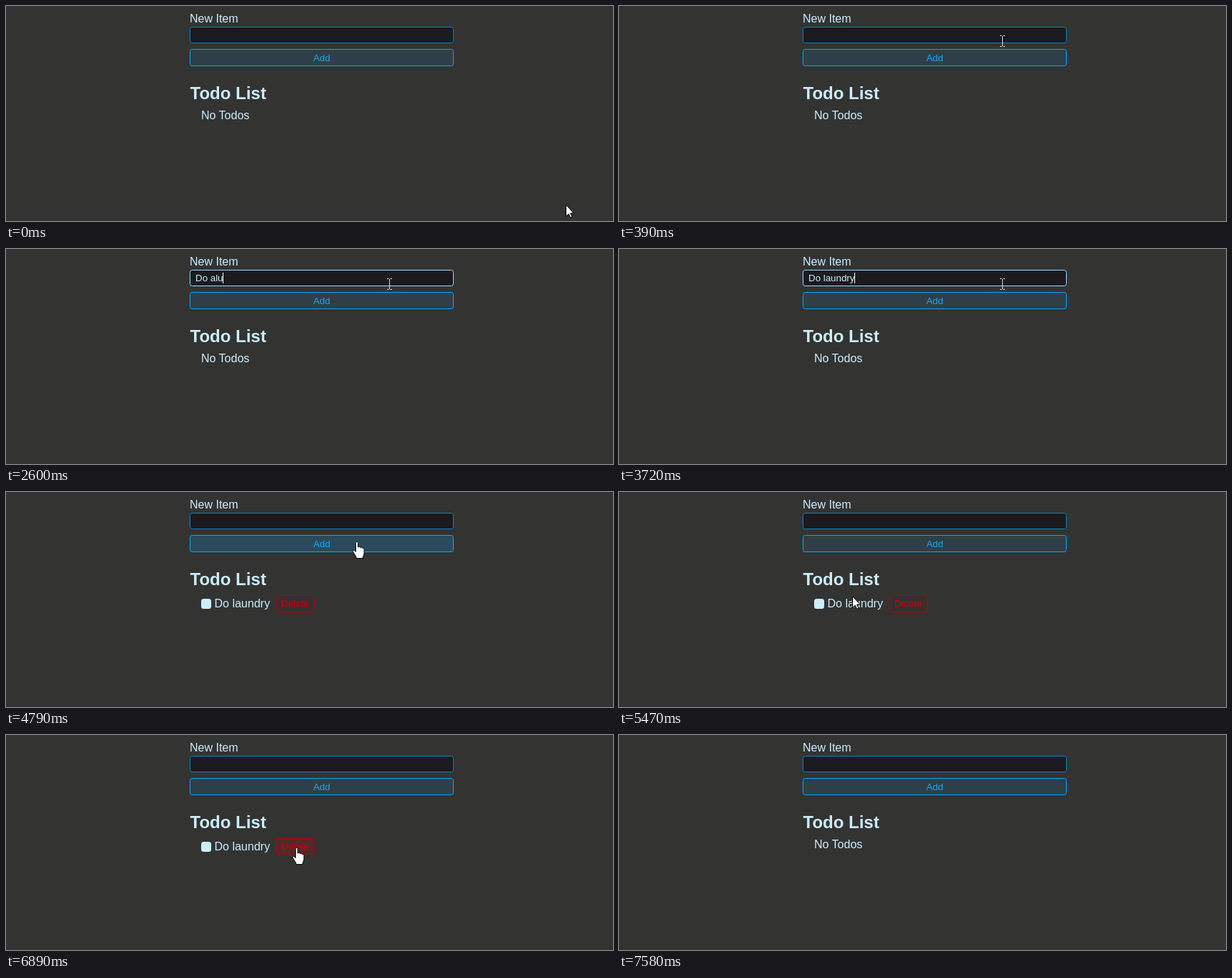
Write an HTML page that moves like this. It is 846 by 300 pixels and loops after 7.91 s.

```html
<!DOCTYPE html>
<html lang="en">
<head>
<meta charset="utf-8">
<title>Todo List</title>
<style>
  html, body { margin: 0; width: 100%; height: 100%; overflow: hidden; background: #333332; }
  svg { display: block; width: 846px; height: 300px; }
  text { font: 16px "Liberation Sans", Arial, sans-serif; fill: #cceeff; white-space: pre; }
  .small { font-size: 13.333px; }
  .head { font-size: 24px; font-weight: bold; }
  .hint { font: 12px "Open Sans", "Noto Sans", sans-serif; fill: #a0a0a0; }
  .pointer { fill: #fff; stroke: #000; stroke-width: 1; stroke-linejoin: round; }
</style>
</head>
<body>
<svg viewBox="0 0 846 300" xmlns="http://www.w3.org/2000/svg">
  <rect width="846" height="300" fill="#333332"/>
  <text x="256" y="23">New Item</text>
  <rect id="field" x="256.5" y="29.5" width="367" height="22" rx="3" fill="#1b1a1e"/>
  <text id="typed" class="small" x="264" y="45"></text>
  <rect id="caret" y="33" width="1" height="15" fill="#fff"/>

  <rect id="add" x="256.5" y="60.5" width="367" height="23" rx="3" stroke="#00aaff"/>
  <text class="small" x="440" y="77" text-anchor="middle" style="fill:#1aa5f5">Add</text>

  <text class="head" x="256.5" y="130">Todo List</text>
  <text id="empty" x="272" y="158">No Todos</text>

  <g id="item">
    <rect id="box" x="272" y="149" width="14" height="14" rx="3.5"/>
    <path id="tick" d="M275 156.5l3 3 5.5-6.5" fill="none" stroke="#fff" stroke-width="2"/>
    <text id="label" x="290.5" y="161">Do laundry</text>
    <rect id="del" x="376.5" y="144.5" width="53" height="23" rx="3" stroke="#b80006"/>
    <text class="small" x="403" y="160" text-anchor="middle" style="fill:#cc0006">Delete</text>
  </g>

  <g id="popup">
    <rect x="357" y="68" width="151" height="74" rx="3" fill="#2b2b2d"/>
    <text class="hint" x="370" y="90">asd</text>
    <text class="hint" x="370" y="124">asdasdasd</text>
  </g>

  <circle id="press" r="12" fill="#fadc0a" fill-opacity=".52"/>
  <g id="cursor">
    <path id="arrow" class="pointer" d="M.5.5V16.5L4.2 13 6.7 18.3 9 17.3 6.6 12H11.2Z"/>
    <path id="beam" d="M-3-7.5H-.5M1.5-7.5H4M-3 7.5H-.5M1.5 7.5H4M.5-7V7" fill="none" stroke="#d8d8d8"/>
    <path id="hand" class="pointer" d="M-1.5 1.2C-1.5-1 1.7-1 1.7 1.2V7.2C2.3 5.8 4.9 6 5 7.8 5.8 6.6 7.7 7 7.9 8.6 8.7 7.8 10.2 8.4 10.2 10V15C10.2 18 8.6 18.6 8.4 22.5H-.6C-.6 19.5-3.2 17.4-5 14-6.2 11.8-4.2 10.4-2.8 12L-1.5 13.5Z"/>
  </g>
</svg>
<script>
const LOOP = 7910;
const $ = id => document.getElementById(id);
const set = (id, name, value) => $(id).setAttribute(name, value);
const show = (id, on) => set(id, "visibility", on ? "inherit" : "hidden");
const within = (t, a, b) => t >= a && t < b;
const mix = (a, b, k) => a + (b - a) * k;
const range = (a, b, step = 70) => Array.from({ length: Math.round((b - a) / step) + 1 }, (_, i) => a + i * step);

// Contents of the field from each time on
const typing = [
  [0, ""], [1390, "D"], [1530, "Do"], [1600, "Do "], [1790, "Do al"], [1860, "Do alu"], [1930, "Do alun"],
  [2130, "Do alundr"],
  ...range(2340, 2730, 97.5).map((t, i) => [t, "Do alundr".slice(0, 8 - i)]),
  [2870, "Do "], [3140, "Do l"], [3250, "Do la"], [3350, "Do lau"], [3460, "Do laund"],
  [3720, "Do laundry"], [4790, ""]
];

// Each leg: the times the pointer steps, its end, and its sideways bow
const legs = [
  { at: [70, 140, 210, 280, 390], to: [534, 49], bow: 0 },
  { at: range(4390, 4600), to: [489, 70], bow: 0 },
  { at: range(5190, 5610), to: [284, 152], bow: 16 },
  { at: range(6410, 6900), to: [410, 158], bow: 0 },
  { at: range(7160, 7510), to: [777, 287], bow: 0 }
];
const presses = [[460, 530], [4720, 4790], [5800, 5870], [6270, 6340], [7020, 7090]];

function pointerAt(t) {
  let [x, y] = [780, 277];
  for (const { at, to, bow } of legs) {
    const k = at.filter(s => s <= t).length / at.length;
    const e = k * k * (3 - 2 * k);
    x = mix(x, to[0], e);
    y = mix(y, to[1], e) + bow * Math.sin(Math.PI * e);
    if (k < 1) break;
  }
  return [x, y];
}

function render(t) {
  const [x, y] = pointerAt(t);
  const over = (l, top, r, b) => x >= l && x < r && y >= top && y < b;
  const focused = within(t, 460, 4720);
  const listed = within(t, 4790, 7090);
  const done = within(t, 5870, 6340);
  const onField = over(256, 29, 624, 52);
  const onAdd = over(256, 60, 624, 84);
  const onDelete = listed && over(376, 144, 430, 168);
  const onLabel = listed && over(272, 146, 368, 165);

  $("typed").textContent = typing.filter(e => e[0] <= t).pop()[1];
  set("caret", "x", Math.floor(264 + $("typed").getComputedTextLength()));
  show("caret", focused && !within(t, 990, 1390) && t < 4250);
  set("field", "stroke", focused ? "#99ddff" : "#0088cc");
  set("add", "fill", onAdd ? "#294b5c" : "#2e3f47");

  show("empty", !listed);
  show("item", listed);
  show("tick", done && listed);
  set("box", "fill", done ? "#358ca3" : "#cceeff");
  $("label").style.fill = done ? "#4f6b78" : "#cceeff";
  set("del", "fill", onDelete ? "#522929" : "#382f2e");

  set("popup", "opacity", within(t, 1460, 1530) ? 0.5 : within(t, 1530, 1600) ? 0.16 : 0);

  set("press", "cx", x - 0.5);
  set("press", "cy", y + 0.5);
  show("press", presses.some(([a, b]) => within(t, a, b)));

  const hand = onAdd || onDelete || onLabel;
  set("cursor", "transform", `translate(${Math.round(x)} ${Math.round(y)})`);
  show("cursor", t < 7580);
  show("hand", hand);
  show("beam", onField);
  show("arrow", !hand && !onField);
}

const start = performance.now();
function tick() {
  render((performance.now() - start) % LOOP);
  requestAnimationFrame(tick);
}
tick();
</script>
</body>
</html>
```
